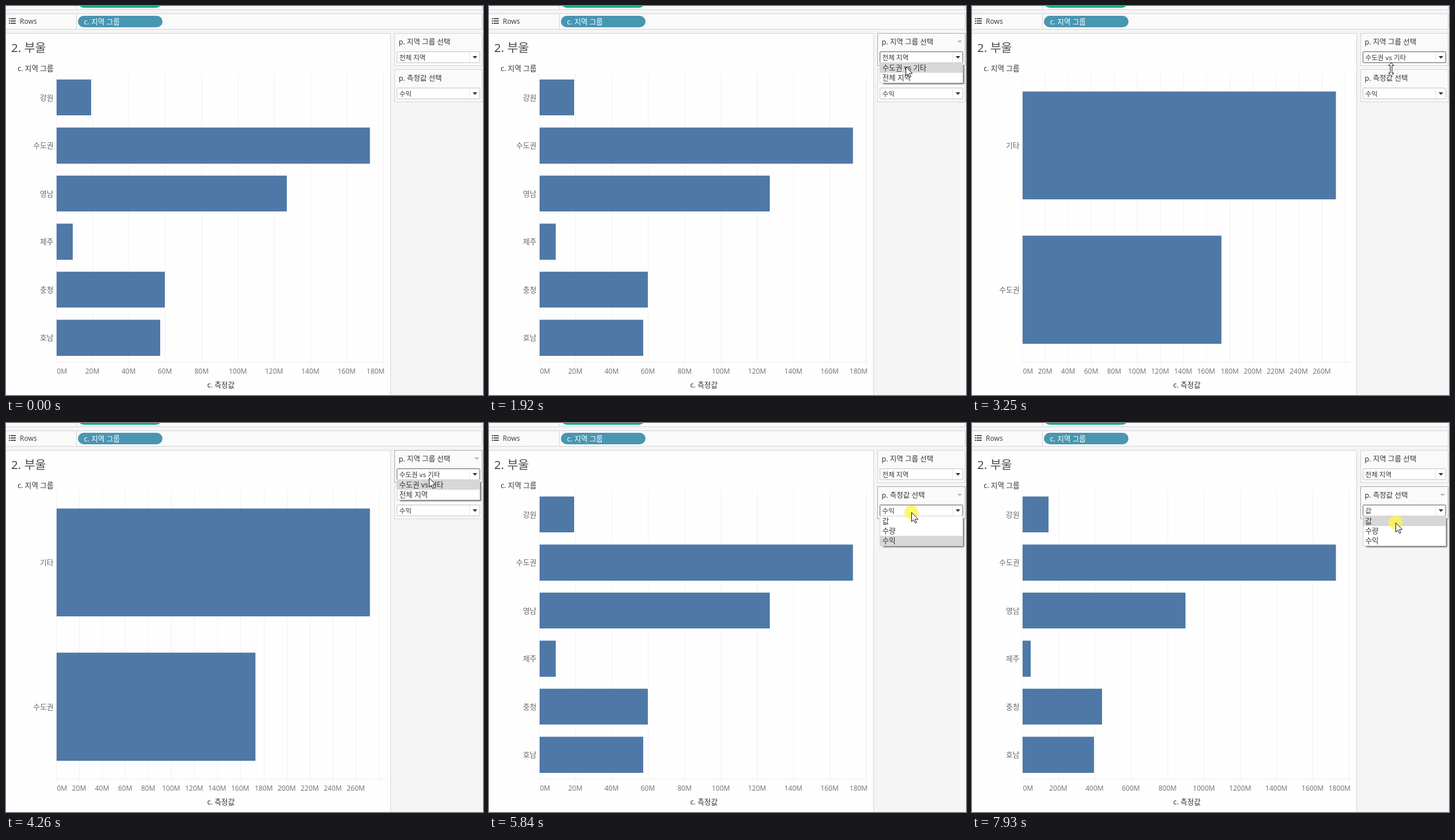
Recreate the animation shown at these times as an HTML page. Size 829 by 676 pixels, loop 8000 ms.

```html
<!DOCTYPE html>
<html lang="ko">
<head>
<meta charset="utf-8">
<title>Parameter chart</title>
<style>
  html, body { margin: 0; width: 100%; height: 100%; overflow: hidden; background: #f5f5f5; }
  svg { display: block; width: 829px; height: 676px; }
  text { font-family: 'Noto Sans', 'Noto Sans CJK KR', 'Noto Sans CJK', sans-serif; white-space: pre; }
</style>
</head>
<body>
<svg id="stage" viewBox="0 0 829 676">
  <defs><filter id="blur"><feGaussianBlur stdDeviation=".8"/></filter></defs>
  <g id="shelf"></g><g id="chart"></g><g id="panels"></g><g id="pointer"></g>
</svg>
<script>
const LOOP = 8000;
const LINE = '#d4d4d4';
const REGIONS = ['강원', '수도권', '영남', '제주', '충청', '호남'];
const GROUPS = ['수도권 vs 기타', '전체 지역'];
const MEASURES = ['값', '수량', '수익'];

// Bar widths in px, grid step in px, axis step in millions
const CHARTS = [
  { rows: REGIONS, bars: [60, 544.5, 400, 28, 188, 180], grid: 63.15, count: 9, unit: 20 },
  { rows: ['기타', '수도권'], bars: [544.5, 345.5], grid: 40.06, count: 14, unit: 20 },
  { rows: REGIONS, bars: [45, 544.5, 283, 14, 138, 124], grid: 63.15, count: 9, unit: 200 }
];

// Each entry changes part of the state from its time on
const STEPS = [
  [0, { chart: 0, hot: 0, focus: 0, open: 0, pick: 0, halo: 0, cursor: '', group: 1, measure: 2 }],
  [380, { cursor: 'arrow' }],
  [926, { hot: 2 }],
  [1082, { hot: 1 }],
  [1540, { open: 1, pick: 1, focus: 1, halo: 1 }],
  [1690, { halo: 0 }],
  [1920, { pick: 0 }],
  [2710, { halo: 1 }],
  [2870, { open: 0, halo: 0 }],
  [3100, { group: 0, cursor: 'resize' }],
  [3250, { chart: 1, hot: 0 }],
  [3500, { cursor: 'arrow' }],
  [3573, { hot: 1 }],
  [4030, { open: 1, halo: 1 }],
  [4260, { halo: 0 }],
  [4590, { pick: 1 }],
  [4900, { halo: 1 }],
  [5140, { open: 0, halo: 0 }],
  [5210, { group: 1 }],
  [5280, { chart: 0, hot: 2 }],
  [5840, { open: 2, pick: 2, focus: 2, halo: 1 }],
  [6070, { halo: 0 }],
  [6226, { pick: 0 }],
  [6550, { halo: 1 }],
  [6780, { open: 0, halo: 0 }],
  [6850, { measure: 0 }],
  [6930, { chart: 2, hot: 0 }],
  [7245, { hot: 2 }],
  [7620, { open: 2, halo: 1 }],
  [7850, { halo: 0 }],
  [7930, { halo: 1 }]
];

// Pointer moves: first step, last step, number of steps, x, y
const MOVES = [
  [380, 1160, 11, 719, 90],
  [1230, 1230, 1, 720, 89],
  [1920, 1920, 1, 724, 105],
  [2010, 2090, 2, 723, 114],
  [2470, 2570, 2, 728, 109],
  [3500, 3720, 4, 735, 95],
  [4430, 4670, 4, 735, 120],
  [5280, 5660, 6, 734, 155],
  [6150, 6380, 4, 731, 177],
  [7100, 7390, 5, 738, 158],
  [7850, 7930, 2, 736, 173]
];

const rect = (x, y, w, h, fill, extra = '') =>
  `<rect x="${x}" y="${y}" width="${w}" height="${h}" fill="${fill}" ${extra}/>`;
const box = (x, y, w, h, fill, stroke) =>
  rect(x + .5, y + .5, w - 1, h - 1, fill, `stroke="${stroke}"`);
const path = (d, fill, extra = '') => `<path d="${d}" fill="${fill}" ${extra}/>`;
const text = (x, y, s, size, fill, anchor = 'start') =>
  `<text x="${x}" y="${y}" font-size="${size}" fill="${fill}" text-anchor="${anchor}">${s}</text>`;

function shelf() {
  let s = box(-1, -9, 829, 16, '#fafafa', LINE) + box(-1, 13, 829, 28, '#fafafa', LINE);
  s += path('M122.5 0V6M122.5 13V40', 'none', `stroke="${LINE}"`);
  s += rect(125, -17, 146, 20, '#00b180', 'rx="10"');
  s += rect(125, 17, 147, 20, '#4996b2', 'rx="10"');
  for (const y of [21, 25, 29]) s += rect(5, y, 2, 2, '#444') + rect(8, y, 9, 2, '#555');
  s += text(24, 31, 'Rows', 12, '#444') + text(135.5, 31.5, 'c. 지역 그룹', 12.6, '#fff');
  return s + box(-1, 47, 670, 640, '#fefefe', LINE);
}

function chart({ rows, bars, grid, count, unit }) {
  let s = text(9, 79.5, '2. 부울', 20.6, '#4a4a4a') +
    text(82.5, 113, 'c. 지역 그룹', 12.6, '#333', 'end') +
    text(373.5, 662.5, 'c. 측정값', 12.6, '#333', 'middle');
  for (let k = 0; k <= count; k++) {
    const x = Math.floor(87.5 + k * grid) + .5;
    s += path(`M${x} 117V623`, 'none', 'stroke="#f0f0f0"');
    const name = k * unit + 'M';
    if (k === 0) s += text(88.5, 638.5, name, 12, '#777');
    else if (k === 9 && count === 9) s += text(658, 638.5, name, 12, '#777', 'end');
    else if (k < 14) s += text(x - .5, 638.5, name, 12, '#777', 'middle');
  }
  s += path('M87 618.5H659', 'none', 'stroke="#f0f0f0"');
  const band = 501 / rows.length;
  rows.forEach((name, i) => {
    const top = 117.3 + band * (i + 1 / 8);
    const bottom = Math.round(top + band * .75);
    s += rect(88, top, bars[i], bottom - top, '#4e79a7');
    s += text(82.5, top + band * 3 / 8 + 4.7, name, 12.8, '#666', 'end');
  });
  return s;
}

function panel(y, title, value, hot, focus) {
  let s = box(675, y, 153, 57, '#fafafa', hot ? '#a6a6a6' : LINE);
  s += text(682.5, y + 19.5, title, 12.5, '#333');
  if (hot) s += path(`M814 ${y + 13}h8l-4 4z`, '#b4b4b4');
  s += rect(679.5, y + 32.5, 144, 19, '#fff', `rx="1" stroke="${focus ? '#5a5a5a' : '#c2c2c2'}"`);
  s += path(`M805.5 ${y + 34}v16`, 'none', 'stroke="#e4e4e4"');
  s += path(`M811 ${y + 40}h8l-4 4.5z`, '#333');
  return s + text(683.5, y + 46.5, value, 11.6, '#333');
}

function list(y, items, pick) {
  const h = items.length * 17 + 2;
  let s = rect(685, y + 5, 140.5, h - 3.5, '#555', 'filter="url(#blur)"');
  s += box(679, y, 145, h, '#fff', '#d0d0d0');
  items.forEach((name, i) => {
    if (i === pick) s += rect(680, y + 1 + i * 17, 143, 17, '#d7d7d7');
    s += text(683.5, y + 14.3 + i * 17, name, 12.6, '#333');
  });
  return s;
}

function panels(s) {
  return panel(47, 'p. 지역 그룹 선택', GROUPS[s.group], s.hot === 1, s.focus === 1) +
    panel(110, 'p. 측정값 선택', MEASURES[s.measure], s.hot === 2, s.focus === 2) +
    (s.open === 1 ? list(98, GROUPS, s.pick) : s.open === 2 ? list(161, MEASURES, s.pick) : '');
}

function pointer(s, [x, y]) {
  const ink = 'stroke="#111" stroke-width="1"';
  if (!s.cursor) return '';
  if (s.cursor === 'resize')
    return path('M728.5 98.5l4.5 5h-3v13h3l-4.5 5l-4.5-5h3v-13h-3z', '#fff', ink);
  const halo = s.halo ? `<circle cx="${x}" cy="${y}" r="12" fill="#fcf64a" opacity=".8"/>` : '';
  return halo + path(`M${x + .5} ${y + .5}v16l3.7-3.4l2.6 5.7l2.4-1.1l-2.5-5.5h5z`, '#fff', ink);
}

const stateAt = t => Object.assign({}, ...STEPS.filter(([at]) => at <= t).map(([, change]) => change));

function pointerAt(t) {
  let x = 812, y = 438;
  for (const [from, to, n, tx, ty] of MOVES) {
    if (t < from) break;
    const gap = (to - from) / (n - 1 || 1) || 1;
    const p = Math.min(n, Math.floor((t - from) / gap + .01) + 1) / n;
    const e = p * p * (3 - 2 * p);
    x += (tx - x) * e;
    y += (ty - y) * e;
  }
  return [Math.round(x), Math.round(y)];
}

const shown = {};
function put(id, html) {
  if (shown[id] === html) return;
  document.getElementById(id).innerHTML = shown[id] = html;
}

function draw() {
  const t = performance.now() % LOOP;
  const state = stateAt(t);
  put('chart', chart(CHARTS[state.chart]));
  put('panels', panels(state));
  put('pointer', pointer(state, pointerAt(t)));
  requestAnimationFrame(draw);
}

put('shelf', shelf());
draw();
</script>
</body>
</html>
```
